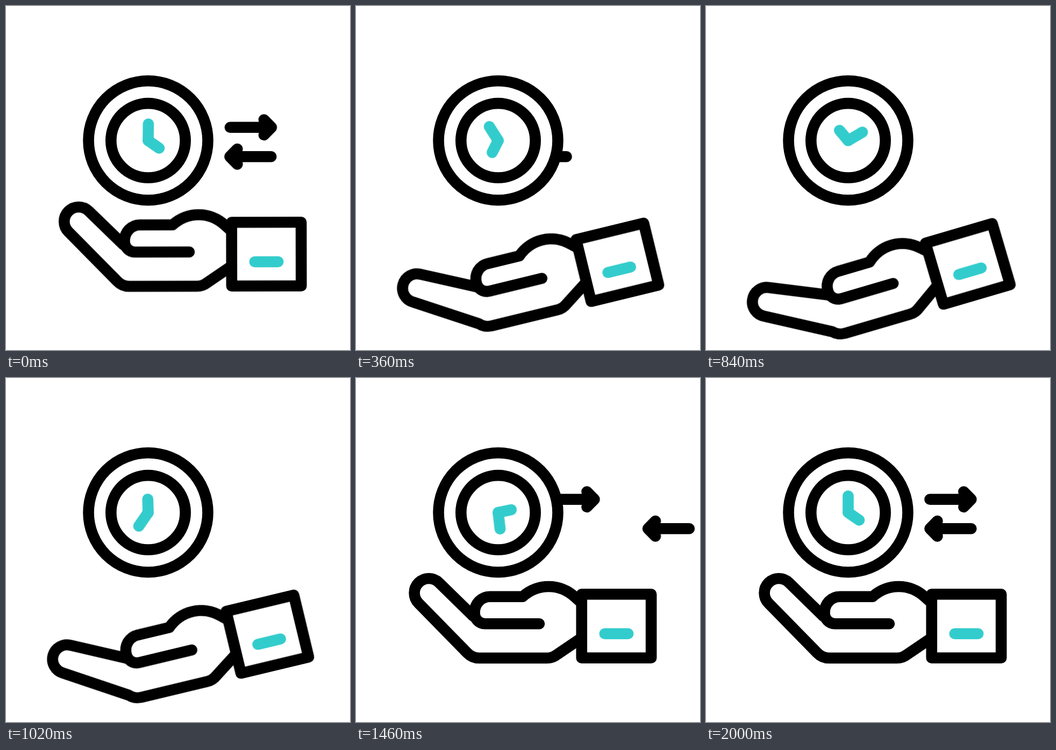
An HTML page that plays this animation: 640 px wide and 640 px high, repeating every 2220 ms.

```html
<!DOCTYPE html>
<html lang="en">
<head>
<meta charset="utf-8">
<title>Time in hand</title>
<style>
  html, body { margin: 0; width: 100%; height: 100%; overflow: hidden; background: #fff; }
  svg { display: block; width: 100%; height: 100%; }

  .ink { fill: none; stroke: #000; stroke-width: 20.6; stroke-linecap: round; stroke-linejoin: round; }
  .accent { stroke: #3cc; }
  .coin { fill: #fff; }

  .minute, .hour, .arm, .palm, .go, .back { animation: 2220ms linear infinite; }

  /* Clock hands: four turns against one */
  .minute, .hour { transform-origin: 264.5px 250.3px; }
  .minute { --turn: 1440deg; animation-name: spin; }
  .hour { --turn: 360deg; animation-name: spin; }
  @keyframes spin {
    0% { transform: rotate(0deg); animation-timing-function: cubic-bezier(.167, .167, .667, 1); }
    90.09%, 100% { transform: rotate(var(--turn)); }
  }

  /* Arm tilts about the cuff while the fingers flatten */
  .arm { transform-origin: 549.5px 461.5px; animation-name: tilt; }
  @keyframes tilt {
    0% { transform: rotate(0deg); animation-timing-function: cubic-bezier(.14, .6, .62, 1); }
    31.53% { transform: rotate(-16.8deg); animation-timing-function: cubic-bezier(.88, 0, .57, 1); }
    60.04%, 100% { transform: rotate(0deg); }
  }
  .palm { animation-name: flatten; }
  @keyframes flatten {
    0% {
      d: path("M218.5 443.5 L154.6 381 A20 20 0 0 0 116.4 419 L207 511.5 Q216 521 229 521 L355 521 Q366 521 374 514.5 L419 484");
      animation-timing-function: cubic-bezier(.14, .6, .62, 1);
    }
    31.53% {
      d: path("M218.5 443.5 L116.6 400.2 A20 20 0 0 0 93.6 449.2 L207 511.5 Q216 521 229 521 L355 521 Q366 521 374 514.5 L419 484");
      animation-timing-function: cubic-bezier(.88, 0, .57, 1);
    }
    60.04%, 100% {
      d: path("M218.5 443.5 L154.6 381 A20 20 0 0 0 116.4 419 L207 511.5 Q216 521 229 521 L355 521 Q366 521 374 514.5 L419 484");
    }
  }

  /* Arrows leave one way and return from the other side */
  .go { --out: 444px; --in: -160px; animation-name: pass; }
  .back { --out: -160px; --in: 406px; animation-name: pass; }
  @keyframes pass {
    0% { transform: translateX(0); animation-timing-function: cubic-bezier(.167, .167, .33, 1); }
    45.04% { transform: translateX(var(--out)); animation-timing-function: step-end; }
    45.05% { transform: translateX(var(--in)); animation-timing-function: cubic-bezier(.26, 0, .33, 1); }
    90.09%, 100% { transform: translateX(0); }
  }
</style>
</head>
<body>
<svg viewBox="0 0 640 640">
  <g class="ink">
    <path class="go" d="M416.5 225.8H493.4M479.4 211.6L493.4 225.8L479.4 240"/>
    <path class="back" d="M493.4 280.2H416.5M430.5 266L416.5 280.2L430.5 294.4"/>

    <circle class="coin" cx="264.5" cy="250.3" r="111"/>
    <circle cx="264.5" cy="250.3" r="69.2"/>
    <g class="accent">
      <path class="minute" d="M264.5 250.3V219.5"/>
      <path class="hour" d="M264.5 250.3L285 264.4"/>
    </g>

    <g class="arm">
      <path class="palm" d="M218.5 443.5 L154.6 381 A20 20 0 0 0 116.4 419 L207 511.5 Q216 521 229 521 L355 521 Q366 521 374 514.5 L419 484"/>
      <path d="M341 457.3H240C229 457.3 220.5 448.5 220.5 436.5C220.5 420 233 406.7 249 406.7H310C338 382 379 381 408 408L419 418"/>
      <rect x="419.8" y="402.2" width="129.4" height="118.6"/>
      <path class="accent" d="M462.8 475.8H506.2"/>
    </g>
  </g>
</svg>
</body>
</html>
```
